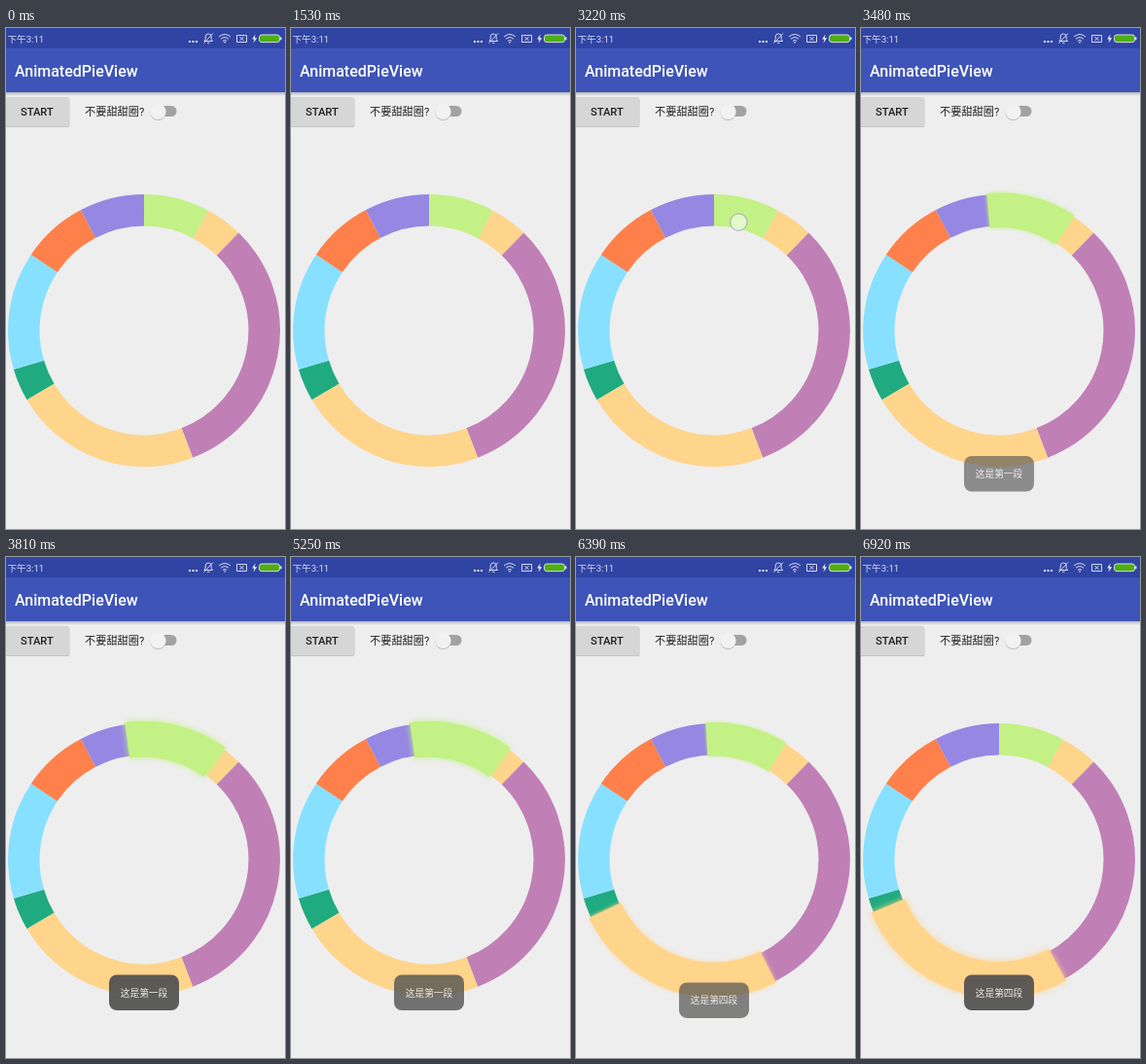
Write an HTML page that moves like this. It is 287 px wide and 515 px high and loops after 8000 ms.

```html
<!DOCTYPE html>
<html lang="zh-CN">
<head>
<meta charset="utf-8">
<title>AnimatedPieView</title>
<style>
  html, body { margin: 0; width: 100%; height: 100%; overflow: hidden; background: #eee; }
  svg { display: block; }
  text { font-family: Roboto, "Noto Sans CJK SC", "Noto Sans CJK", "Noto Sans CJK JP", sans-serif; }
  .icon { fill: none; stroke: #d3d9f1; stroke-width: 1; }
</style>
</head>
<body>
<svg width="287" height="515" viewBox="0 0 287 515">
  <defs>
    <linearGradient id="edge" x1="0" y1="0" x2="0" y2="1">
      <stop offset="0" stop-color="#b4b6be"/>
      <stop offset="1" stop-color="#eee"/>
    </linearGradient>
  </defs>
  <rect width="287" height="515" fill="#eee"/>

  <!-- status bar and title -->
  <rect y="66" width="287" height="4" fill="url(#edge)"/>
  <rect width="287" height="66" fill="#3e54b8"/>
  <rect width="287" height="21" fill="#3044a3"/>
  <text x="1.5" y="15" font-size="9.6" fill="#d8ddf3">下午3:11</text>
  <g fill="#e4e8f8">
    <rect x="188" y="13" width="2" height="2"/>
    <rect x="191.5" y="13" width="2" height="2"/>
    <rect x="195" y="13" width="2" height="2"/>
  </g>
  <path class="icon" d="M204 13.5h8.5l-1.3-2V9a3 3 0 0 0-6 0v2.5zM207 15.3h2.5M203.5 15.5l9.5-10"/>
  <g class="icon" stroke-width="1.3">
    <path d="M219 9q6-5 12 0M221 11.3q4-3.4 8 0M223 13.3q2-1.6 4 0"/>
    <circle cx="225" cy="14.8" r=".5"/>
  </g>
  <path class="icon" d="M237.5 7.5h10v7h-10zM240.5 9l4 4M244.500 9l-4 4"/>
  <path d="M256.500 6.500l-3.300 5h2.200l-.9 4 3.700-5.300h-2.300z" fill="#e4e8f8"/>
  <rect x="260.500" y="7" width="21" height="7.600" rx="2.500" fill="#4fae12" stroke="#cfe0d8"/>
  <rect x="282" y="9.300" width="1.500" height="3" fill="#cfe0d8"/>
  <text x="9" y="50" font-size="16" font-weight="500" fill="#fff">AnimatedPieView</text>

  <!-- controls -->
  <rect x="-1" y="72" width="66.500" height="30" rx="2" fill="#c6c6c6"/>
  <rect x="-1" y="71" width="66" height="30" rx="2" fill="#d6d6d6"/>
  <text x="15" y="90" font-size="11.2" font-weight="500" fill="#202020">START</text>
  <text x="81" y="90" font-size="11.2" fill="#222">不要甜甜圈?</text>
  <rect x="151" y="80" width="24.500" height="11" rx="5.500" fill="#a2a2a2"/>
  <circle cx="156.500" cy="87" r="8" fill="#bbb"/>
  <circle cx="156.500" cy="86" r="8" fill="#f2f2f2"/>

  <g id="ring" fill="none"></g>
  <circle id="dot" r="8.700" fill="#fff" fill-opacity=".55" stroke="#8f9bb0" stroke-opacity=".65" stroke-width="1.300"/>
  <g id="toast">
    <rect x="106" y="429.500" width="72" height="36.500" rx="8" fill="#535352" fill-opacity=".94"/>
    <text id="note" x="142" y="451.500" font-size="9.700" fill="#eee" text-anchor="middle"></text>
  </g>
</svg>
<script>
const LOOP = 8000;
const CX = 142, CY = 311, R = 123.7, WIDTH = 32.5;
const GROW_ANGLE = 8, GROW_WIDTH = 4.5, GLOW = 3.2;

const $ = id => document.getElementById(id);
const clamp = x => Math.max(0, Math.min(1, x));
const easeOut = x => 1 - (1 - clamp(x)) ** 2;

// end angle in degrees clockwise from the top, colour
const slices = [
  [28, '#c3f185'], [44.1, '#ffd48b'], [159, '#c080b6'], [239.4, '#ffd48b'],
  [253.4, '#20aa80'], [303.9, '#87e0ff'], [332.3, '#ff804b'], [360, '#9687e2']
].map(([end, color], i, all) => ({ start: i ? all[i - 1][0] : 0, end, color }));

const taps = [
  { slice: 0, x: 167.3, y: 199.5, down: 3220, up: 3280, drop: 6120, note: '这是第一段', hide: 5215 },
  { slice: 3, x: 117.5, y: 422.8, down: 6040, up: 6160, drop: Infinity, note: '这是第四段', hide: Infinity }
];

function point(deg) {
  const a = deg * Math.PI / 180;
  return `${(CX + R * Math.sin(a)).toFixed(2)} ${(CY - R * Math.cos(a)).toFixed(2)}`;
}

function shape(s, lift) {
  const a = s.start - GROW_ANGLE * lift, b = s.end + GROW_ANGLE * lift;
  s.el.setAttribute('d', `M${point(a)}A${R} ${R} 0 ${b - a > 180 ? 1 : 0} 1 ${point(b)}`);
  s.el.setAttribute('stroke-width', WIDTH + GROW_WIDTH * lift);
  s.el.style.filter = lift > 0 ? `drop-shadow(0 0 ${GLOW * lift}px ${s.color})` : 'none';
}

for (const s of slices) {
  s.el = document.createElementNS('http://www.w3.org/2000/svg', 'path');
  s.el.setAttribute('stroke', s.color);
  $('ring').append(s.el);
  shape(s, 0);
}
// liftable slices lie above their neighbours
for (const tap of taps) $('ring').append(slices[tap.slice].el);

function draw(t) {
  let dot = null, alpha = 0, shift = 0;
  for (const tap of taps) {
    const lift = easeOut((t - tap.up) / 500) * (1 - easeOut((t - tap.drop) / 800));
    shape(slices[tap.slice], lift);
    if (t >= tap.down && t < tap.up) dot = tap;
    const shown = easeOut((t - tap.up - 30) / 400);
    const visible = shown * (1 - clamp((t - tap.hide) / 250));
    if (visible > 0) {
      alpha = visible;
      shift = 32 * (1 - shown);
      $('note').textContent = tap.note;
    }
  }
  $('dot').style.display = dot ? '' : 'none';
  if (dot) $('dot').setAttribute('transform', `translate(${dot.x} ${dot.y})`);
  $('toast').setAttribute('opacity', alpha);
  $('toast').setAttribute('transform', `translate(0 ${shift})`);
}

const began = performance.now();
function tick() {
  draw((performance.now() - began) % LOOP);
  requestAnimationFrame(tick);
}
tick();
</script>
</body>
</html>
```
